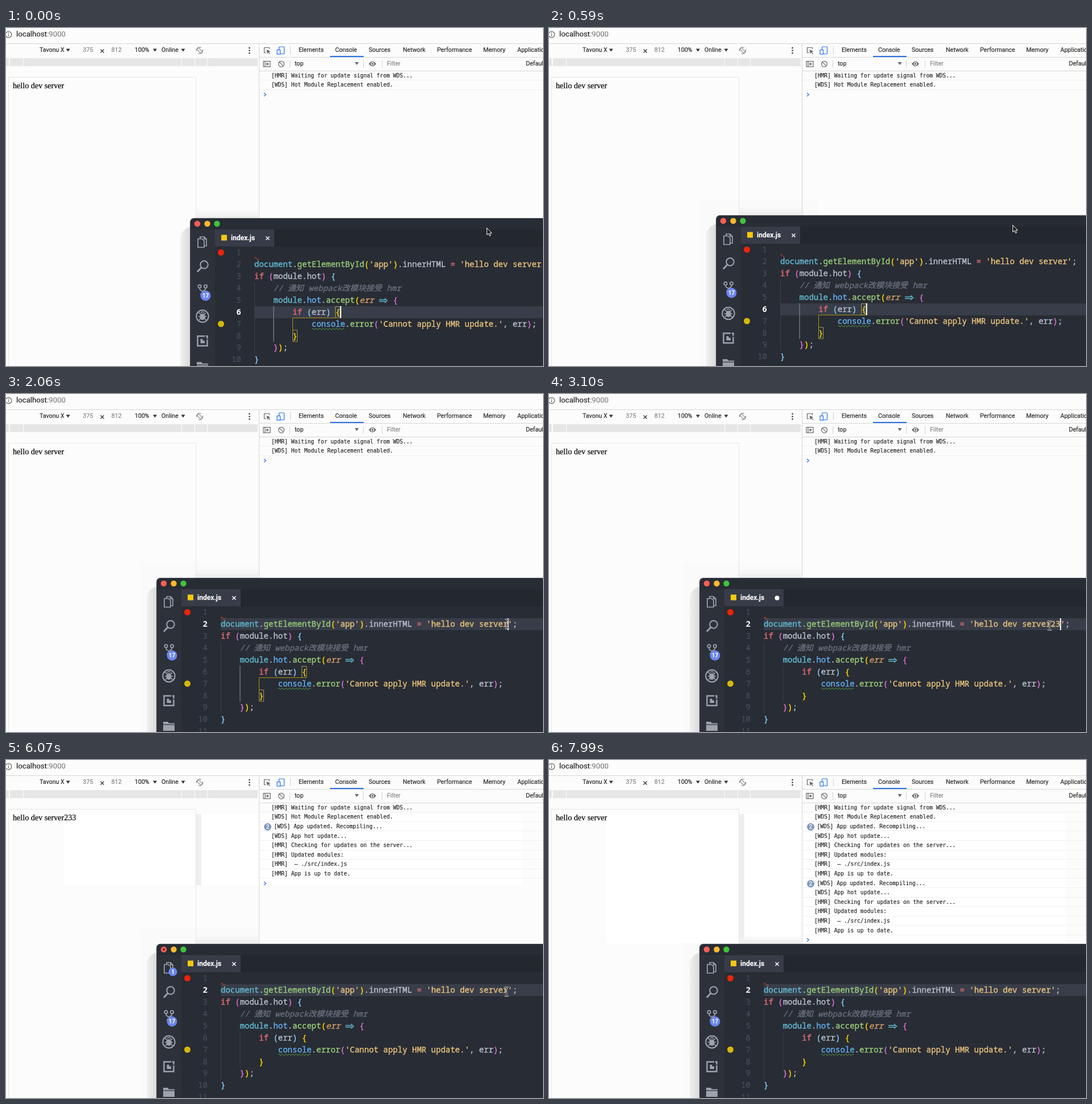
Animation, 943 px wide and 594 px high, one loop 8290 ms. Source, as an HTML page:

```html
<!DOCTYPE html>
<html lang="zh-CN">
<head>
<meta charset="utf-8">
<title>Hot module replacement</title>
<style>
html, body { margin: 0; width: 100%; height: 100%; overflow: hidden; }
body { position: relative; background: #fcfcfc; }
#stage { position: absolute; left: 0; top: 0; width: 943px; height: 594px; overflow: hidden; font: 10.6px/16px Roboto, "Liberation Sans", sans-serif; color: #222; }
#stage div, #stage svg { position: absolute; }
.t { white-space: pre; -webkit-text-stroke: .15px; }
.dim { color: #808080; }
svg { overflow: visible; }

#page { left: 12px; top: 92px; font: 14.1px/18px "Liberation Serif", "Times New Roman", serif; color: #000; white-space: pre; -webkit-text-stroke: .2px; }
#tint { left: 237px; top: 296px; width: 206px; height: 300px; background: #fafafa; }
#patch { left: 101px; top: 95px; width: 805px; background: #fff; }
#edge { left: 334px; top: 95px; width: 9px; background: #efefef; }
#frame { left: 4px; top: 86px; width: 328px; height: 520px; border: 1px solid #e6e6e6; }

.row { left: 445px; width: 498px; height: 16.6px; border-bottom: 1px solid #f0f0f0; box-sizing: border-box; font: 9.6px/16.6px "DejaVu Sans Mono", "Liberation Mono", monospace; white-space: pre; }
.row span { position: absolute; left: 21px; -webkit-text-stroke: .15px; }
.row.many span { left: 25.5px; }
.row b { position: absolute; left: 8px; top: 2px; width: 13px; height: 13px; border-radius: 50%; background: #8097bd; color: #fff; font: 500 10.5px/13px Roboto, sans-serif; text-align: center; }

#clip { left: 334px; top: 76px; width: 109px; height: 518px; overflow: hidden; }
#halo { left: -40px; top: 232px; width: 300px; height: 24px; background: linear-gradient(rgba(225,225,225,0), #f2f2f2 40%, #dedede); }
#win { left: 265px; top: 324px; width: 740px; height: 330px; }
#side { left: -18px; top: 14px; width: 40px; height: 300px; border-radius: 22px 0 0 0; background: linear-gradient(90deg, #f1f1f1, #d9d9d9 18px); }
#body { left: 0; top: 0; width: 740px; height: 330px; border-radius: 6px 0 0 0; background: #282c34; overflow: hidden; box-shadow: 0 0 0 1px #4a4d54; }
#bar { left: 0; top: 19px; width: 43px; height: 320px; background: #2d313a; }
#strip { left: 43px; top: 19px; width: 700px; height: 30px; background: #23272e; }
#tab { left: 43px; top: 19px; width: 104px; height: 30px; background: #383c48; }
#name { left: 71px; top: 26px; font-size: 12px; font-weight: 600; color: #fff; }
#active { left: 112px; width: 640px; height: 20.9px; background: #383d49; }
.line { left: 112px; height: 20.9px; -webkit-text-stroke: .4px; }
.line, .num { font: 500 14px/20.9px "Noto Sans Mono", "Noto Sans CJK SC", "DejaVu Sans Mono", monospace; color: #b6bdc9; white-space: pre; }
.num { left: 60px; width: 29px; text-align: right; font-weight: 400; color: #4b5263; }
.num.on { color: #fff; font-weight: 600; }
#stage .line svg { position: relative; vertical-align: -1px; }
.k { color: #e06c75; } .c { color: #61b8cf; } .f { color: #98c979; } .s { color: #e5c07b; }
.b { color: #61afef; } .a { color: #d19a66; font-style: italic; } .m { color: #676f7d; font-style: italic; }
.g { color: #ffd700; } .o { color: #da70d6; } .l { color: #87cefa; }
#typed { font-style: normal; }
#caret { width: 2px; height: 20.9px; background: #fff; }
</style>
</head>
<body>
<div id="stage">
  <div id="tint"></div>
  <div id="patch"></div>
  <div id="edge"></div>
  <div id="frame"></div>
  <svg width="943" height="594" fill="none" stroke="#666" stroke-width="1.2">
    <g fill="#e6e6e6" stroke="none">
      <path d="M0 53h5v14H0zM7 53h23v14H7zM31 53h277v14H31zM309 53h22v14H309zM332 53h21v14H332zM354 53h88v14H354z"/>
    </g>
    <path d="M0 27.5H943M444.5 28V594M445 51.5H943M445 75.5H943" stroke="#d6d6d6" stroke-width="1"/>
    <path d="M499.5 32v14M498.5 57v13M627.5 57v13M660.5 57v13" stroke="#d0d0d0" stroke-width="1"/>
    <path d="M569 50h59" stroke="#2a72e6" stroke-width="2"/>
    <g fill="#333" stroke="none">
      <path d="M105.500 36.500h7l-3.500 5zM258 36.500h7l-3.500 5zM307.500 36.500h7l-3.500 5z"/>
      <path d="M612.500 60h7l-3.500 5z" fill="#666"/>
      <circle cx="427.500" cy="35" r="1.300"/><circle cx="427.500" cy="39.500" r="1.300"/><circle cx="427.500" cy="44" r="1.300"/>
    </g>
    <path d="M166 37.500l6 6m0-6l-6 6" stroke="#333"/>
    <circle cx="4.500" cy="11.500" r="5.300"/><path d="M4.500 10.500v4M4.500 8v1.400"/>
    <g transform="translate(340 39.500) rotate(-45)" stroke="#777" stroke-width="1"><circle r="5.600" stroke-dasharray="12 5.600" stroke-dashoffset="-3"/><rect x="-2" y="-5" width="4" height="10" rx="1" fill="#fcfcfc"/></g>
    <path d="M462.500 37v-2.500h-9v9h3"/><path d="M457.500 38l7 3-3 1.200 2.500 3-1 .8-2.500-3-1.600 2.500z" fill="#666" stroke="none"/>
    <g stroke="#2a72e6"><rect x="479.500" y="33" width="9" height="12.500" rx="1"/><rect x="476" y="38.500" width="5.500" height="7.500" fill="#fcfcfc"/></g>
    <rect x="452" y="58.500" width="12" height="9.500"/><path d="M455 58.500v9.500"/><path d="M457.500 60.500l4.500 2.800-4.500 2.800z" fill="#666" stroke="none"/>
    <circle cx="483.500" cy="63.300" r="5"/><path d="M480 59.800l7 7"/>
    <path d="M637 63q6.500-8.500 13 0q-6.500 8.500-13 0z" fill="#666" stroke="none"/><circle cx="643.500" cy="63" r="2.300" stroke="#fff" fill="#666"/>
  </svg>
  <div id="labels"></div>
  <div id="page"></div>
  <div id="rows"></div>
  <svg id="prompt" width="10" height="10" style="left:450px" fill="none" stroke="#3b82e8" stroke-width="1.500"><path d="M3 2l3.200 3L3 8"/></svg>

  <div id="clip"><div id="halo"></div></div>
  <div id="win">
    <div id="side"></div>
    <div id="body">
      <div id="bar"></div><div id="strip"></div><div id="tab"></div>
      <div id="name" class="t">index.js</div>
      <div id="active"></div>
      <div id="code"></div>
      <svg width="740" height="330" fill="none" stroke="#9da2ac" stroke-width="1.700">
        <g stroke="none">
          <circle cx="12" cy="9" r="5.200" fill="#fa5d57"/><circle cx="29.500" cy="9" r="5.200" fill="#f9b92f"/><circle cx="46.500" cy="9" r="5.200" fill="#3fc43d"/>
          <rect x="54" y="28.500" width="10" height="10" fill="#f5c90f"/>
          <circle cx="53.500" cy="59.500" r="5.500" fill="#ea2408"/><circle cx="53.500" cy="185" r="5.500" fill="#d5b80b"/>
        </g>
        <path id="close" d="M132.500 31.500l6 6m0-6l-6 6" stroke="#fff" stroke-width="1.500"/>
        <circle id="dot" cx="135.500" cy="34.500" r="4" fill="#fff" stroke="none"/>
        <path d="M112.500 112v125" stroke="#3b4048" stroke-width="1"/>
        <path d="M146 153.700v62.700" stroke="#3b4048" stroke-width="1"/>
        <g id="scope" stroke-width="1">
          <path d="M146 153.700v62.700" stroke="#8b8e96"/>
          <path d="M254.500 154.500h8.500v20h-8.500zM179.500 196h8v20h-8z" stroke="#a39a52"/>
          <path d="M263 174.500H179.500V196" stroke="#a89312"/>
        </g>
        <path d="M112 70q2-4 4 0t4 0" stroke="#e0432f" stroke-width="1"/>
        <path id="wave" stroke="#5da548" stroke-width="1"/>
        <path d="M17 35.500V32h7l4 4v12h-4M13 35.500h7.500l3.500 3.500v11.500H13zM24 32v4h4"/>
        <circle cx="24" cy="81" r="6.700" stroke-width="2"/><path d="M19 86l-7 7.500" stroke-width="2.800"/>
        <circle cx="16" cy="119" r="2.700"/><circle cx="26.500" cy="119" r="2.700"/><circle cx="21" cy="133" r="2.700"/><path d="M16 122q0 4 5 5.500q5.500-1.500 5.500-5.500M21 127v3"/>
        <circle cx="21" cy="171.500" r="10.700" stroke-width="2"/>
        <ellipse cx="21" cy="172.500" rx="3.700" ry="5" fill="#9da2ac"/><path d="M13.500 164l15 15M14 172h14M15 178l3-3M27 166l-3 2M18 165.500q3-3.500 6 0"/>
        <path d="M12.500 206.500h17v17h-17z" stroke-width="2.400"/><path d="M17.500 211.500h4v3h3.500v4.500h-7.500z" fill="#9da2ac" stroke="none"/><path d="M26 205v7h5" stroke="#2d313a"/>
        <path d="M11 252h8l2 2.500h10V268H11z" fill="#9da2ac" stroke="none"/><path d="M11 257h20" stroke="#2d313a" stroke-width="1.200"/>
        <g fill="#fff" stroke="none" font-family="Roboto, sans-serif" font-size="10" font-weight="600" text-anchor="middle">
          <circle cx="26.500" cy="135.500" r="9" fill="#6b86ee"/><text x="26.500" y="139">17</text>
          <g id="badge"><circle cx="28" cy="48.200" r="7.500" fill="#6b86ee"/><text x="28" y="51.800">1</text><circle cx="12" cy="9" r="1.900" fill="#4a1512"/></g>
        </g>
      </svg>
      <div id="caret"></div>
    </div>
  </div>
  <svg id="arrow" width="12" height="18"><path d="M.5.500V12.500L3.300 10l2 4.500 2-.9-2-4.300H9z" fill="#111" stroke="#fff" stroke-width="1"/></svg>
  <svg id="beam" width="8" height="18" fill="none"><path d="M-3.500-8Q0-8 0-5Q0-8 3.500-8M0-6V6M-3.500 8Q0 8 0 5Q0 8 3.500 8M-1.500 2h3" stroke="#eee" stroke-width="2.200"/><path d="M-3.500-8Q0-8 0-5Q0-8 3.500-8M0-6V6M-3.500 8Q0 8 0 5Q0 8 3.500 8M-1.500 2h3" stroke="#222" stroke-width="1"/></svg>
</div>
<script>
const LOOP = 8290, ROW = 16.6, LINE = 20.9, CHAR = 8.4;
const $ = id => document.getElementById(id);
const show = (id, on) => { $(id).style.display = on ? '' : 'none'; };
const move = (id, x, y) => { $(id).style.transform = `translate(${x}px, ${y}px)`; };
const lineTop = n => 49.2 + (n - 1) * LINE;

function add(parent, cls, html, css) {
  const el = document.createElement('div');
  el.className = cls;
  el.innerHTML = html;
  el.style.cssText = css;
  $(parent).append(el);
  return el;
}

// Toolbar labels: text, x, centre y, class
[
  ['Tavonu X', 59, 39], ['375', 135, 39, 'dim'], ['812', 185, 39, 'dim'], ['100%', 226, 39], ['Online', 273, 39],
  ['Elements', 514, 39], ['Console', 578, 39], ['Sources', 637, 39], ['Network', 697, 39],
  ['Performance', 757, 39], ['Memory', 838, 39], ['Application', 898, 39],
  ['top', 507, 63], ['Filter', 669, 63, 'dim'], ['Default levels', 913, 63]
].forEach(([s, x, y, cls = '']) => add('labels', 't ' + cls, s, `left:${x}px;top:${y - 8}px`));
add('labels', 't', 'localhost<span class="dim">:9000</span>', 'left:18px;top:3px;font-size:13.2px');

const update = ['[WDS] App updated. Recompiling...', '[WDS] App hot update...', '[HMR] Checking for updates on the server...',
  '[HMR] Updated modules:', '[HMR]  – ./src/index.js', '[HMR] App is up to date.'];
const rows = ['[HMR] Waiting for update signal from WDS...', '[WDS] Hot Module Replacement enabled.', ...update, ...update]
  .map((s, i) => {
    const many = s === update[0];
    return add('rows', 'row' + (many ? ' many' : ''), (many ? '<b>2</b>' : '') + `<span>${s}</span>`, `top:${75.7 + i * ROW}px`);
  });

// Code lines as class, text pairs
const arrow = '<svg width="16.8" height="10" fill="none" stroke="currentColor" stroke-width="1.300"><path d="M1 3.500h12M1 6.500h12M11 1l4.500 4L11 9"/></svg>';
const code = [
  [],
  ['c', 'document', '', '.', 'f', 'getElementById', 'g', '(', 's', "'app'", 'g', ')', '', '.innerHTML ', 'k', '=', '', ' ', 's', "'hello dev server<i id=\"typed\"></i>'", '', ';'],
  ['k', 'if', '', ' ', 'o', '(', '', 'module.hot', 'o', ')', '', ' ', 'l', '{'],
  ['m', '    // 通知 webpack改模块接受 hmr'],
  ['c', '    module', '', '.', 'b', 'hot', '', '.', 'f', 'accept', 'g', '(', 'a', 'err', '', ' ', 'c', arrow, '', ' ', 'o', '{'],
  ['k', '        if', '', ' ', 'l', '(', '', 'err', 'l', ')', '', ' ', 'g', '{'],
  ['b', '            console', '', '.', 'f', 'error', 'o', '(', 's', "'Cannot apply HMR update.'", '', ', err', 'o', ')', '', ';'],
  ['g', '        }'],
  ['o', '    }', 'g', ')', '', ';'],
  ['l', '}'],
  []
];
const nums = code.map((parts, i) => {
  const top = `top:${lineTop(i + 1)}px`;
  let html = '';
  for (let j = 0; j < parts.length; j += 2) html += `<span class="${parts[j]}">${parts[j + 1]}</span>`;
  add('code', 'line', html, top);
  return add('code', 'num', i + 1, top);
});
$('wave').setAttribute('d', 'M213 194q1.500-3 3 0' + 't3 0'.repeat(18));

// Each step changes part of the scene state
const steps = [
  [0, { dx: 59, dy: 11, tint: 0, mx: 785, my: 340, kind: 'arrow', line: 6, caret: 1, scope: 1, typed: '', dirty: 0, badge: 0, log: 2, page: '' }],
  [150, { caret: 0 }],
  [440, { dx: 48, dy: 9, tint: 1 }],
  [590, { dx: 29, dy: 6, caret: 1 }],
  [740, { dx: 10, dy: 2 }],
  [890, { dx: 0, dy: 0, caret: 0 }],
  [1330, { mx: 790, my: 345, caret: 1 }],
  [1480, { mx: 805, my: 362 }],
  [1630, { mx: 831, my: 386, kind: 'beam' }],
  [1780, { mx: 856, my: 398, caret: 0 }],
  [1920, { mx: 873, my: 403 }],
  [2060, { mx: 880, my: 404, line: 2, caret: 1 }],
  [2210, { my: 406, scope: 0 }],
  [2360, { mx: 879, my: 407 }],
  [2660, { typed: '2', dirty: 1 }],
  [2960, { typed: '23' }],
  [3110, { typed: '233' }],
  [3250, { badge: 1 }],
  [3700, { dirty: 0, caret: 0 }],
  [3850, { badge: 0 }],
  [3990, { log: 3 }],
  [4140, { log: 8, page: '233' }],
  [4290, { caret: 1 }],
  [4740, { caret: 0 }],
  [5180, { typed: '23', dirty: 1, caret: 1 }],
  [5330, { typed: '2' }],
  [5470, { typed: '' }],
  [5620, { badge: 1 }],
  [6070, { dirty: 0, caret: 0 }],
  [6220, { badge: 0 }],
  [6370, { log: 9 }],
  [6510, { log: 14, page: '' }],
  [6660, { caret: 1 }],
  [6960, { mx: 882, my: 413, caret: 0 }],
  [7110, { mx: 889, my: 440 }],
  [7260, { mx: 905, my: 492 }],
  [7400, { mx: 928, my: 563 }],
  [7550, { kind: '', caret: 1 }],
  [7990, { caret: 0 }]
];

function draw(s) {
  move('win', s.dx, s.dy);
  move('halo', 0, s.dy);
  move('tint', s.dx, s.dy);
  show('tint', s.tint);
  ['arrow', 'beam'].forEach(k => { show(k, s.kind === k); move(k, s.mx + s.dx, s.my + s.dy); });
  nums.forEach((el, i) => el.classList.toggle('on', i + 1 === s.line));
  $('active').style.top = lineTop(s.line) + 'px';
  const col = s.line === 6 ? 18 : 60 + s.typed.length;
  move('caret', 111.5 + col * CHAR, lineTop(s.line));
  show('caret', s.caret);
  show('scope', s.scope);
  show('badge', s.badge);
  show('dot', s.dirty);
  show('close', !s.dirty);
  $('typed').textContent = s.typed;
  $('page').textContent = 'hello dev server' + s.page;
  rows.forEach((el, i) => { el.style.display = i < s.log ? '' : 'none'; });
  $('prompt').style.top = 79 + s.log * ROW + 'px';
  const h = s.log < 8 ? 0 : s.log < 14 ? 125 : 227;
  $('patch').style.height = $('edge').style.height = h + 'px';
}

const start = performance.now();
let last = -1;
function tick() {
  const t = (performance.now() - start) % LOOP;
  const past = steps.filter(([at]) => at <= t);
  if (past.length !== last) {
    last = past.length;
    draw(Object.assign({}, ...past.map(p => p[1])));
  }
  requestAnimationFrame(tick);
}
tick();
</script>
</body>
</html>
```
